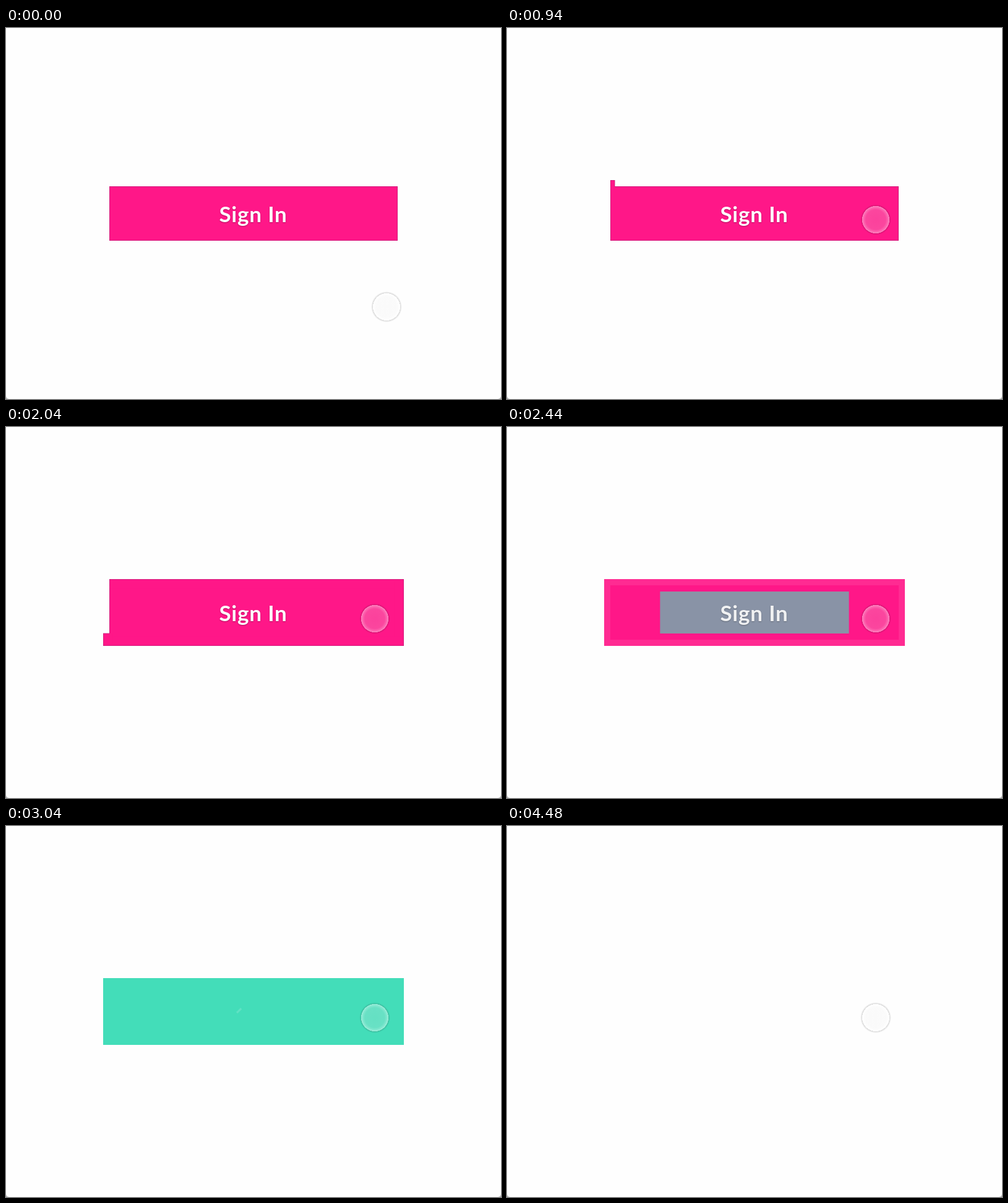
An HTML page with a canvas for the animation above (6.42 s loop, 800x600 px).

```html
<!DOCTYPE html>
<html lang="en">
<head>
<meta charset="utf-8">
<title>Sign In button</title>
<style>
  html, body { margin: 0; width: 100%; height: 100%; overflow: hidden; background: #b4b4b4; }
  canvas { display: block; }
</style>
</head>
<body>
<canvas id="stage" width="800" height="600"></canvas>
<script>
const ctx = document.getElementById('stage').getContext('2d');

const LOOP = 6420;
const WHITE = '#fefefe', PINK = '#ff1788', EDGE = '#c81d78', TEAL = '#43ddb9';
const BUTTON = [167, 256, 466, 88];
const PANEL = [157, 246, 486, 108];

const BORDER_START = 910, STRIP_TIME = 350;
const FILL_START = 2250, FILL_TIME = 680;
const CHECK_START = 3030, CHECK_TIME = 610;
const EXIT_START = 4250, EXIT_END = 4480;

const progress = (t, start, duration) => Math.min(1, Math.max(0, (t - start) / duration));
const easeInOut = (p, power = 2) =>
  p < .5 ? (2 * p) ** power / 2 : 1 - (2 - 2 * p) ** power / 2;
const easeOut = p => 1 - (1 - p) ** 3;
const easeInBack = (p, s = .5) => p * p * ((s + 1) * p - s);

function fill(color, [x, y, w, h], inset = 0) {
  ctx.fillStyle = color;
  ctx.fillRect(x + inset, y + inset, w - 2 * inset, h - 2 * inset);
}

function scaled(scale, alpha, draw) {
  ctx.save();
  ctx.translate(400, 300);
  ctx.scale(scale, scale);
  ctx.translate(-400, -300);
  ctx.globalAlpha = alpha;
  draw();
  ctx.restore();
}

function drawStage() {
  ctx.clearRect(0, 0, 800, 600);
  ctx.fillStyle = WHITE;
  ctx.beginPath();
  ctx.roundRect(0, 0, 800, 600, [0, 0, 5, 5]);
  ctx.fill();
}

// Border strips run clockwise; each one overlaps the button so no seam shows.
function growingShapes(t) {
  const [top, right, bottom, left] = [0, 1, 2, 3].map(i =>
    easeInOut(progress(t, BORDER_START + i * STRIP_TIME, STRIP_TIME)));
  const shapes = [BUTTON];
  if (top) shapes.push([167, 246, 476 * top, 16]);
  if (right) shapes.push([627, 250, 16, 6 + 98 * right]);
  if (bottom) shapes.push([633 - 476 * bottom, 338, 476 * bottom + 6, 16]);
  if (left) shapes.push([157, 344 - 98 * left, 16, 98 * left + 6]);
  return shapes;
}

function drawLabel(alpha) {
  ctx.save();
  ctx.globalAlpha = alpha;
  ctx.font = '700 35px Lato, sans-serif';
  ctx.letterSpacing = '0.8px';
  ctx.textAlign = 'center';
  ctx.fillStyle = WHITE;
  ctx.shadowColor = 'rgba(0,0,0,.3)';
  ctx.shadowBlur = 2;
  ctx.shadowOffsetY = 1;
  ctx.fillText('Sign In', 399.5, 314);
  ctx.restore();
}

function drawCheck(t) {
  if (t < CHECK_START) return;
  ctx.save();
  ctx.globalAlpha *= Math.min(1, .1 + (t - CHECK_START) / 200);
  ctx.strokeStyle = '#fff';
  ctx.lineWidth = 10;
  ctx.setLineDash([2 + 68 * progress(t, CHECK_START, CHECK_TIME), 100]);
  ctx.beginPath();
  ctx.moveTo(375.5, 297.5);
  ctx.lineTo(393, 315);
  ctx.lineTo(424.5, 283);
  ctx.stroke();
  ctx.restore();
}

function drawButton(t) {
  if (t < FILL_START) {
    const shapes = growingShapes(t);
    shapes.forEach(shape => fill(EDGE, shape));
    shapes.forEach(shape => fill(PINK, shape, .8));
    drawLabel(1);
  } else if (t < FILL_START + FILL_TIME) {
    const p = progress(t, FILL_START, FILL_TIME);
    const cover = easeOut(p), fade = 1 - easeInOut(p, 3);
    scaled(1, fade, () => fill(PINK, PANEL));
    fill(PINK, BUTTON);
    scaled(cover, cover, () => fill(TEAL, PANEL));
    drawLabel(fade);
  } else if (t < EXIT_END) {
    const scale = 1 - easeInBack(progress(t, EXIT_START, EXIT_END - EXIT_START));
    scaled(scale, Math.min(1, scale), () => {
      fill(TEAL, PANEL);
      drawCheck(t);
    });
  }
}

function drawCursor(t) {
  const p = easeInOut(progress(t, 0, 660));
  const x = 615 - 19 * p, y = 451 - 141 * p, radius = 25;
  const shade = ctx.createRadialGradient(x, y, 0, x, y, radius);
  [
    [0, 'rgba(235,235,235,.2)'],
    [16, 'rgba(238,238,238,.22)'],
    [20.5, 'rgba(255,255,255,.38)'],
    [21.9, 'rgba(255,255,255,.5)'],
    [22.4, 'rgba(0,0,0,.13)'],
    [23.4, 'rgba(0,0,0,.08)'],
    [25, 'rgba(0,0,0,0)']
  ].forEach(([r, color]) => shade.addColorStop(r / radius, color));
  ctx.fillStyle = shade;
  ctx.beginPath();
  ctx.arc(x, y, radius, 0, 2 * Math.PI);
  ctx.fill();
}

function render() {
  const t = performance.now() % LOOP;
  drawStage();
  drawButton(t);
  drawCursor(t);
  requestAnimationFrame(render);
}
render();
</script>
</body>
</html>
```
